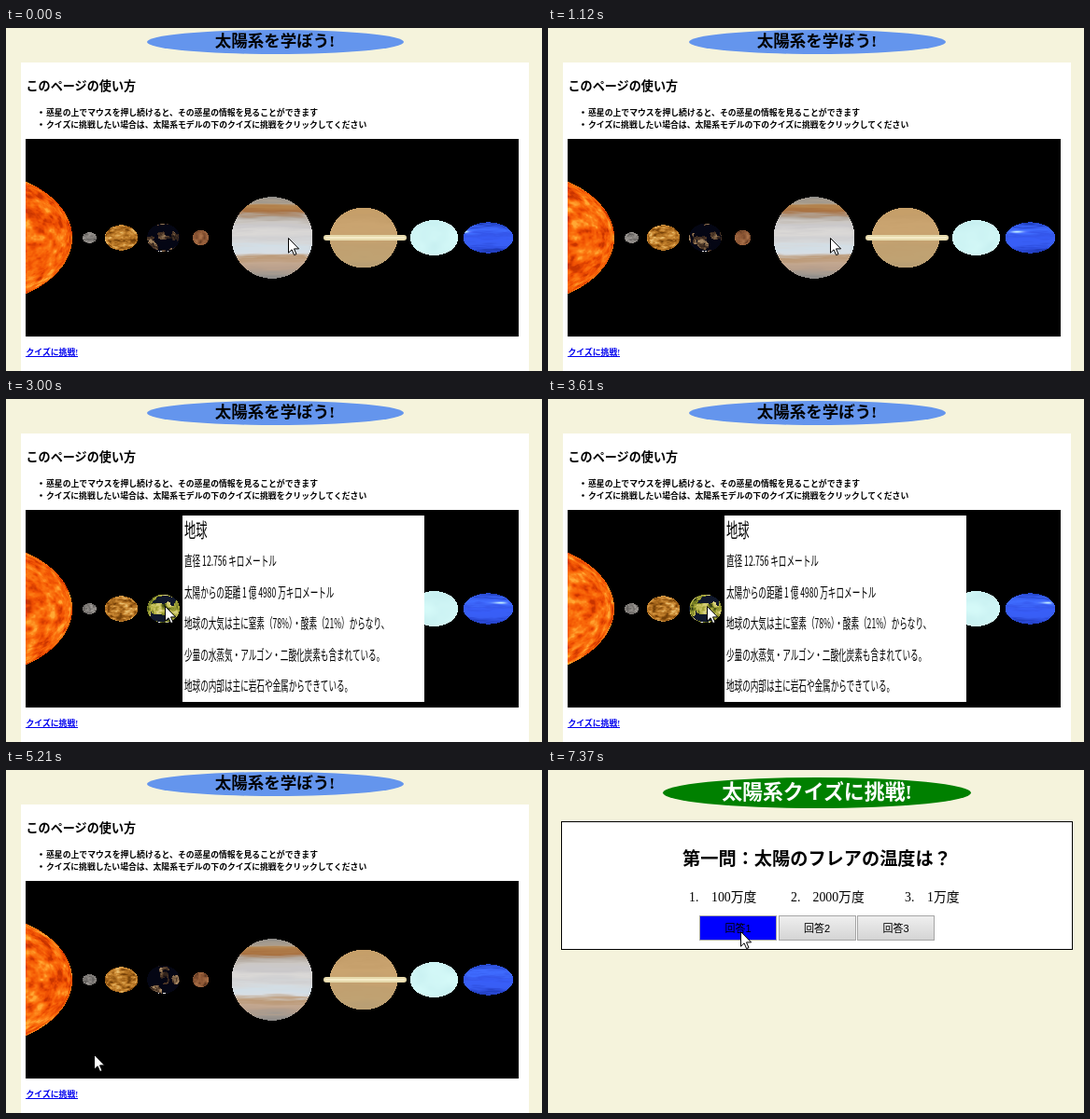
An HTML page with a canvas for the animation above (7530 ms loop, 574 by 368 pixels).

```html
<!DOCTYPE html>
<html lang="ja">
<head>
<meta charset="utf-8">
<title>太陽系を学ぼう!</title>
<style>
  html, body { margin: 0; width: 574px; height: 368px; overflow: hidden; background: #f5f3dc; }
  canvas, svg { position: absolute; left: 0; top: 0; }
  canvas { left: 21px; top: 119px; z-index: 1; }
  #over { z-index: 2; }
  text { font-family: "Noto Sans CJK JP", "Noto Sans CJK", sans-serif; white-space: pre; }
  .serif { font-family: "Liberation Serif", "Noto Sans CJK JP", "Noto Sans CJK", serif; }
  .b { font-weight: bold; }
  .mid { text-anchor: middle; }
  .small { font-size: 8.84px; font-weight: bold; }
  .opt { font-size: 13.8px; }
  .button rect { fill: url(#face); stroke: #a6a6a6; }
  .button text { font: 11px "Liberation Sans", "Noto Sans CJK JP", sans-serif; text-anchor: middle; }
  .button.hover rect { fill: #00f; }
</style>
</head>
<body>
<svg id="home" width="574" height="368">
  <ellipse cx="288.5" cy="15" rx="137.5" ry="13" fill="#6495ed"/>
  <text class="serif b mid" x="288" y="19.5" font-size="17.5">太陽系を学ぼう!</text>
  <rect x="16" y="37" width="544" height="331" fill="#fff"/>
  <text class="b" x="21.5" y="66.7" font-size="13.1">このページの使い方</text>
  <circle cx="37.5" cy="90.5" r="1.3"/>
  <text class="small" x="43" y="93.7">惑星の上でマウスを押し続けると、その惑星の情報を見ることができます</text>
  <circle cx="37.5" cy="103.5" r="1.3"/>
  <text class="small" x="43" y="106.7">クイズに挑戦したい場合は、太陽系モデルの下のクイズに挑戦をクリックしてください</text>
  <text class="serif small" x="21.5" y="351" fill="#00e">クイズに挑戦!</text>
  <rect x="21" y="352" width="56" height="1" fill="#00e"/>
</svg>

<svg id="quiz" width="574" height="368">
  <defs>
    <linearGradient id="face" x2="0" y2="1">
      <stop stop-color="#efefef"/><stop offset="1" stop-color="#d4d4d4"/>
    </linearGradient>
  </defs>
  <ellipse cx="288" cy="24.5" rx="165" ry="16.5" fill="#008000"/>
  <text class="serif b mid" x="288" y="30.5" font-size="21.9" fill="#fff">太陽系クイズに挑戦!</text>
  <rect x="14.5" y="55.5" width="547" height="137" fill="#fff" stroke="#000"/>
  <text class="b mid" x="288" y="102" font-size="19.2">第一問：太陽のフレアの温度は？</text>
  <g class="opts">
    <text class="serif opt" x="151" y="141">1.</text><text class="serif opt" x="175" y="141">100万度</text>
    <text class="serif opt" x="260" y="141">2.</text><text class="serif opt" x="283.5" y="141">2000万度</text>
    <text class="serif opt" x="382" y="141">3.</text><text class="serif opt" x="406" y="141">1万度</text>
  </g>
  <g id="buttons"></g>
</svg>

<canvas id="space" width="528" height="212"></canvas>

<svg id="over" width="574" height="368">
  <g id="popup">
    <rect x="189" y="125" width="259" height="200" fill="#fff"/>
    <g id="info" transform="translate(191 0) scale(.585 1)"></g>
  </g>
  <path id="cursor" d="M.5 .5V16.2L4.1 12.8 6.6 18.6 9 17.6 6.5 11.9H11.6Z" fill="#fff" stroke="#000"/>
</svg>

<script>
const $ = id => document.getElementById(id);
const LOOP = 7530, QUIZ = 37, SPIN = 0.1;

// The picture advances in discrete steps: [first, last, count] in ms.
const spans = [[160, 1120, 7], [1270, 2210, 7], [2360, 3300, 7], [3460, 4420, 7],
               [4550, 5510, 7], [5660, 5820, 2], [6430, 6890, 4], [7220, 7370, 2]];
const times = [0];
for (const [a, b, n] of spans)
  for (let i = 0; i < n; i++) times.push(a + (b - a) * i / (n - 1));

// Cursor stops: step, x, y
const path = [[0, 302, 225], [9, 302, 225], [13, 179, 228], [16, 170, 222], [29, 170, 222],
              [35, 56, 346], [37, 56, 346], [41, 272, 173], [42, 238, 174], [43, 206, 173]];

const popups = [
  { from: 3, to: 6, lines: ['木星', '直径 142.984 キロメートル', '太陽からの距離 7 億 7830 万キロメートル',
    '木星の大気は主に水素（90%）・ヘリウム（10%）からなり、', '少量のメタン・アンモニアも含まれている。',
    '木星の内部は主に水素やヘリウムからできている。'] },
  { from: 17, to: 24, earth: true, lines: ['地球', '直径 12.756 キロメートル', '太陽からの距離 1 億 4980 万キロメートル',
    '地球の大気は主に窒素（78%）・酸素（21%）からなり、', '少量の水蒸気・アルゴン・二酸化炭素も含まれている。',
    '地球の内部は主に岩石や金属からできている。'] }
];

const clamp = v => Math.max(0, Math.min(1, v));

function hash(x, y, z) {
  let h = Math.imul(x, 374761393) ^ Math.imul(y, 668265263) ^ Math.imul(z, 1440662683);
  h = Math.imul(h ^ h >>> 13, 1274126177);
  return ((h ^ h >>> 16) >>> 0) / 4294967296;
}

function noise(x, y, z) {
  const X = Math.floor(x), Y = Math.floor(y), Z = Math.floor(z);
  const ease = t => t * t * (3 - 2 * t), mix = (a, b, t) => a + (b - a) * t;
  const u = ease(x - X), v = ease(y - Y), w = ease(z - Z);
  const row = (j, k) => mix(hash(X, Y + j, Z + k), hash(X + 1, Y + j, Z + k), u);
  return mix(mix(row(0, 0), row(1, 0), v), mix(row(0, 1), row(1, 1), v), w);
}

// Contrasty fractal noise, fx across and fy along the axis
function cloud(p, fx, fy = fx) {
  let sum = 0, amp = 0.55;
  for (let i = 0, s = 1; i < 3; i++, s *= 2, amp /= 2)
    sum += amp * noise(p.x * fx * s + 9, p.y * fy * s + 5, p.z * fx * s + 7);
  return clamp((sum / 0.9625 - 0.5) * 1.9 + 0.5);
}

const palette = s => s.split(' ').map(h => [0, 2, 4].map(i => parseInt(h.substr(i, 2), 16)));
function ramp(stops, t) {
  const f = clamp(t) * (stops.length - 1), i = Math.min(stops.length - 2, Math.floor(f));
  return stops[i].map((c, k) => c + (stops[i + 1][k] - c) * (f - i));
}
const grain = (colors, fx, fy) => {
  const stops = palette(colors);
  return p => ramp(stops, cloud(p, fx, fy));
};
const bands = (colors, warp, fx, fy) => {
  const stops = palette(colors);
  return p => ramp(stops, (p.y + 1) / 2 + (cloud(p, fx, fy) - 0.5) * warp);
};

const night = palette('100c10 4c3626 b4946c'), day = palette('2c3414 7c8424 b8b448 e0d890');
function earth(p, lit) {
  if (p.y > 0.92 && cloud(p, 5) > 0.5) return [235, 235, 235];
  const n = cloud(p, 1.6);
  if (n > (lit ? 0.36 : 0.62)) return ramp(lit ? day : night, cloud(p, 4));
  return lit ? [16, 24, 44] : [4, 6, 20];
}

const sea = bands('1c3cb8 3358e8 3f6cff 3456ea 385ef8 385ef4 2c4cdc 1c38b0', 0.2, 1.5, 8);
function neptune(p) {
  const lon = Math.atan2(p.x, p.z);
  const glow = 130 * Math.exp(-(((lon + 1.32) / 0.35) ** 2) - ((p.y + 0.38) / 0.07) ** 2);
  return sea(p).map(c => c + glow);
}

const planets = [
  { x: -45, rx: 116, ry: 73.5, skin: grain('c83400 ec4c02 f86408 fc7c14 ffa834', 10) },
  { x: 89.5, rx: 7.7, ry: 5.7, skin: grain('5c5a58 827e7a a09c98', 3) },
  { x: 123.5, rx: 17.6, ry: 13.6, skin: grain('744008 a8681c cc8a34 e8bc6c', 3, 5) },
  { x: 168.5, rx: 17.3, ry: 15.2, skin: earth },
  { x: 208.5, rx: 8.7, ry: 8.2, skin: grain('5c3620 8c5634 a87048', 2) },
  { x: 285, rx: 43.4, ry: 43.8, skin: bands('908e8a b0a290 b4844e a87040 b4aaa0 ccc8c4 cac8ca dad8d6 d0d0d2 ' +
    'd6d8da d2dee6 d8dee4 bc9a78 c4a890 b9a08c a49a90 8c8a88', 0.07, 0.9, 14) },
  { x: 383, rx: 36.3, ry: 32.2, skin: bands('c8a068 c49e6a caa470 c6a270 c0a070 c0a272 b89e74', 0.15, 1, 7) },
  { x: 458.5, rx: 25.6, ry: 19, skin: grain('c8f0f1 cff5f5 d4f9f8', 1) },
  { x: 516.5, rx: 26.6, ry: 16.6, skin: neptune }
];

const ctx = $('space').getContext('2d', { willReadFrequently: true });

function drawPlanet(img, { x: cx, rx, ry, skin }, turn, lit) {
  const c = Math.cos(turn), s = Math.sin(turn), ox = cx - 21, oy = 106;
  for (let y = Math.floor(oy - ry); y <= oy + ry; y++)
    for (let x = Math.max(0, Math.floor(ox - rx)); x <= ox + rx; x++) {
      const nx = (x + 0.5 - ox) / rx, ny = (y + 0.5 - oy) / ry, d = 1 - nx * nx - ny * ny;
      if (d < 0) continue;
      const nz = Math.sqrt(d);
      const rgb = skin({ x: nx * c - nz * s, y: ny, z: nx * s + nz * c }, lit);
      img.data.set(rgb, (y * 528 + x) * 4);
    }
}

function drawSpace(step, lit) {
  ctx.fillStyle = '#000';
  ctx.fillRect(0, 0, 528, 212);
  const img = ctx.getImageData(0, 0, 528, 212);
  for (const p of planets) drawPlanet(img, p, step * SPIN, lit);
  ctx.putImageData(img, 0, 0);
  ctx.fillStyle = '#e6d9ac';
  ctx.beginPath();
  ctx.roundRect(319, 103, 89, 6, 3);
  ctx.fill();
  ctx.fillStyle = '#f5ecc8';
  ctx.fillRect(321, 105, 85, 2);
}

$('buttons').innerHTML = [162, 246.5, 331].map((x, i) => `<g class="button">
  <rect x="${Math.round(x) + 0.5}" y="156.5" width="82" height="26"/>
  <text x="${x + 41.5}" y="174">回答${i + 1}</text></g>`).join('');
const buttons = [...$('buttons').children];

function cursorAt(step) {
  const i = Math.max(1, path.findIndex(k => k[0] >= step));
  const [s0, x0, y0] = path[i - 1], [s1, x1, y1] = path[i];
  const t = (step - s0) / (s1 - s0);
  return [Math.round(x0 + (x1 - x0) * t), Math.round(y0 + (y1 - y0) * t)];
}

function show(step) {
  const quiz = step >= QUIZ;
  const popup = popups.find(p => step >= p.from && step <= p.to);
  const [x, y] = cursorAt(step);
  $('home').style.display = $('space').style.display = quiz ? 'none' : '';
  $('quiz').style.display = quiz ? '' : 'none';
  $('popup').style.display = popup ? '' : 'none';
  $('cursor').setAttribute('transform', `translate(${x} ${y})`);
  if (popup) $('info').innerHTML = popup.lines.map((line, i) =>
    `<text y="${i ? 146 + i * 33.4 : 148.5}" font-size="${i ? 14.7 : 21}" font-weight="500">${line}</text>`).join('');
  buttons.forEach((b, i) => {
    const left = 162 + i * 84.5;
    b.classList.toggle('hover', quiz && x >= left && x < left + 83 && y >= 156 && y < 183);
  });
  if (!quiz) drawSpace(step, !!(popup && popup.earth));
}

let start, shown = -1;
function tick(now) {
  start ??= now;
  const t = (now - start) % LOOP;
  const step = times.findLastIndex(at => at <= t);
  if (step !== shown) show(shown = step);
  requestAnimationFrame(tick);
}
show(shown = 0);
requestAnimationFrame(tick);
</script>
</body>
</html>
```
